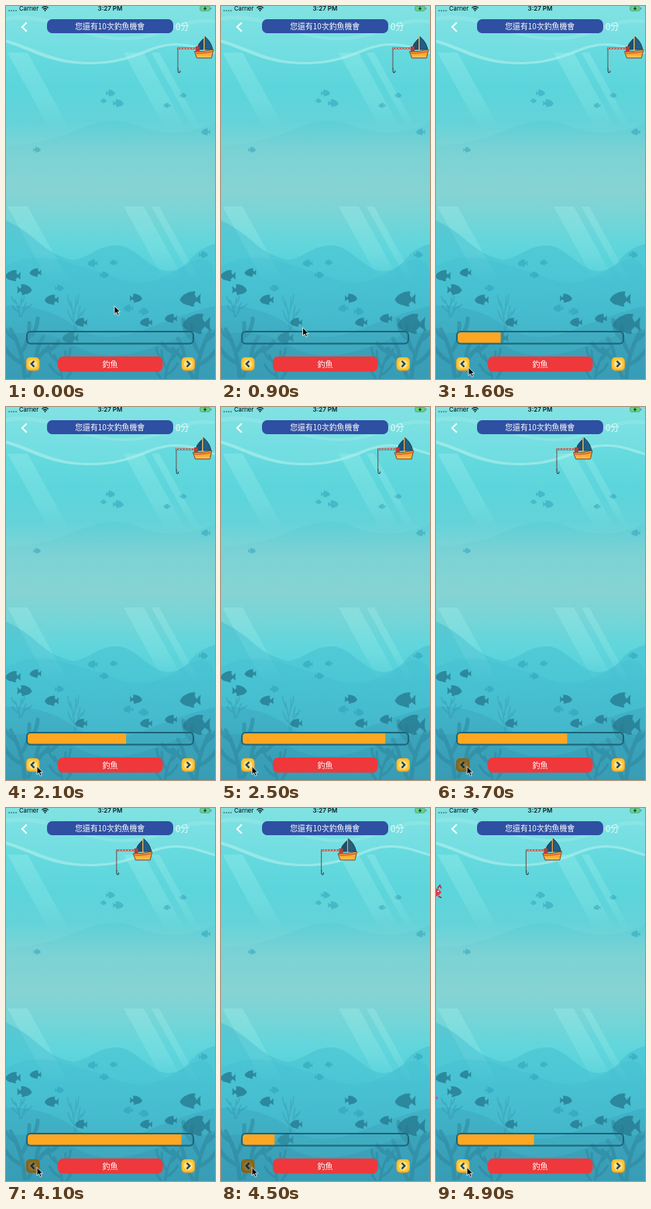
Animation of 270x480 px, one loop 5000 ms. Source, as an HTML page:

```html
<!DOCTYPE html>
<html lang="zh-Hant">
<head>
<meta charset="utf-8">
<title>釣魚</title>
<style>
html, body { margin: 0; width: 100%; height: 100%; overflow: hidden; background: #5cd2da; }
svg { display: block; width: 100vw; height: 100vh; }
text { font-family: "Noto Sans CJK TC", "Noto Sans CJK", "Noto Sans", sans-serif; fill: #fff; }
.status { font-family: Inter, Roboto, sans-serif; fill: #0c1f24; }
</style>
</head>
<body>
<svg viewBox="0 0 270 480" preserveAspectRatio="none">
  <defs>
    <linearGradient id="water" x2="0" y2="1">
      <stop offset="0" stop-color="#78dfdf"/>
      <stop offset=".1" stop-color="#68dbdf"/>
      <stop offset=".22" stop-color="#5bd5db"/>
      <stop offset=".31" stop-color="#64d3d9"/>
      <stop offset=".39" stop-color="#80d4d5"/>
      <stop offset=".5" stop-color="#86d3d3"/>
      <stop offset=".57" stop-color="#75d5d7"/>
      <stop offset=".64" stop-color="#61d6dc"/>
      <stop offset=".72" stop-color="#56d0da"/>
      <stop offset=".84" stop-color="#4fbfd0"/>
      <stop offset="1" stop-color="#46a6bd"/>
    </linearGradient>
    <linearGradient id="ray" x2="0" y2="1">
      <stop offset="0" stop-color="#a8f3ee" stop-opacity=".3"/>
      <stop offset=".6" stop-color="#a8f3ee" stop-opacity=".22"/>
      <stop offset="1" stop-color="#a8f3ee" stop-opacity="0"/>
    </linearGradient>
    <linearGradient id="hill" x2="0" y2="1">
      <stop offset="0" stop-color="#2cacc6" stop-opacity=".34"/>
      <stop offset="1" stop-color="#2cacc6" stop-opacity=".06"/>
    </linearGradient>
    <linearGradient id="rise" x2="0" y2="1">
      <stop offset="0" stop-color="#3cbccb" stop-opacity=".16"/>
      <stop offset="1" stop-color="#3cbccb" stop-opacity="0"/>
    </linearGradient>
    <g id="fish">
      <path d="M10 1C8-4 4-6 0-6Q-4-6-6-1L-10-5Q-9 0-10 5L-6 2Q-3 6 1 6Q7 6 10 1Z"/>
      <path d="M4-5Q0-8-5-7L-4-3ZM3 5Q-1 8-4 7L-3 3Z"/>
    </g>
    <path id="coral" fill="none" stroke-linecap="round" stroke-linejoin="round" d="M22 85Q20 52 4 24M17 54Q29 40 28 16M9 36Q-4 28-8 12M27 34Q38 28 39 10M27 84Q35 62 53 47M37 66Q36 50 46 34M47 52Q58 52 66 40M20 68Q4 62-6 44"/>
    <g id="button">
      <rect x="-8.7" y="-8.5" width="17.4" height="17.4" rx="5" fill="#f0a324"/>
      <rect x="-7.9" y="-8.2" width="15.8" height="15.6" rx="4.5" fill="#ffc534"/>
      <circle r="5.6" fill="#ffe08a"/>
      <path d="M1.8-3.8L-2 0L1.8 3.8" fill="none" stroke="#1d4552" stroke-width="2.2"/>
    </g>
  </defs>

  <rect width="270" height="480" fill="url(#water)"/>
  <path d="M0 0H270V59C250 53 240 48 218 48C185 48 165 71 112 72C65 73 40 55 0 43Z" fill="#a4ebe8" opacity=".2"/>
  <path d="M0 43C40 55 65 73 112 72C165 71 185 48 218 48C240 48 250 53 270 59V62C250 57 240 51 218 51C188 51 168 74 112 75C60 76 40 60 0 47Z" fill="#c8f7f1" opacity=".5"/>
  <path d="M0 14C55 4 95 40 150 40S225 10 270 18V22C220 17 205 45 150 44S55 11 0 19Z" fill="#c2f5ef" opacity=".2"/>
  <path d="M0 180C45 178 70 168 95 158S145 144 168 153S225 171 270 150V230H0Z" fill="url(#rise)"/>
  <g id="rays" fill="url(#ray)"></g>
  <path d="M0 276Q22 286 42 304T87 327C110 323 118 308 143 308S185 341 210 341Q226 341 238 326T270 306V480H0Z" fill="url(#hill)"/>
  <path d="M0 335Q35 316 75 328T150 352T225 337T270 346V480H0Z" fill="#36abc4" opacity=".16"/>
  <path d="M0 386Q50 384 88 411T180 416T270 386V480H0Z" fill="#3192ac" opacity=".24"/>
  <path d="M0 424Q45 412 88 437T190 439T270 422V480H0Z" fill="#2d87a2" opacity=".24"/>
  <g stroke="#2c8299" opacity=".5" stroke-width="5">
    <use href="#coral" transform="translate(2 392)"/>
    <use href="#coral" transform="translate(268 394) scale(-1 1)"/>
    <use href="#coral" transform="translate(60 435) scale(.6)"/>
    <use href="#coral" transform="translate(218 434) scale(-.6 .6)"/>
    <use href="#coral" transform="translate(10 370) scale(.35)" opacity=".6"/>
    <use href="#coral" transform="translate(82 366) scale(.3 .6)" opacity=".5"/>
  </g>
  <g id="shoal"></g>

  <g class="status">
    <g id="dots"></g>
    <text class="status" x="17" y="6.2" font-size="7.6" font-weight="500">Carrier</text>
    <path d="M46.3 2.4Q50.5-1 54.7 2.4M48 4.3Q50.5 2.2 53 4.3" fill="none" stroke="#0c1f24" stroke-width="1.3"/>
    <circle cx="50.5" cy="5.8" r="1"/>
    <text class="status" x="134.5" y="6.2" font-size="8" font-weight="600" text-anchor="middle">3:27 PM</text>
    <rect x="250.8" y=".2" width="12.5" height="6" rx="1.6" fill="#63d87c" stroke="#4b8a8d" stroke-width=".7"/>
    <path d="M258 .2L254.8 3.7H257L256 6.3L259.5 2.7H257.2Z"/>
    <rect x="264.2" y="2" width="1.2" height="2.4" rx=".6" fill="#4b8a8d"/>
  </g>

  <path d="M26.8 21.2L20.8 27L26.8 32.8" fill="none" stroke="#f2ffff" stroke-width="2"/>
  <rect x="53" y="17" width="163" height="18" rx="6.5" fill="#2f4fa2"/>
  <text x="134.2" y="29.8" font-size="9.9" text-anchor="middle">您還有10次釣魚機會</text>
  <text x="219" y="30.5" font-size="11.4" opacity=".85">0分</text>

  <g id="swimmers">
    <g id="red">
      <path d="M0 6Q-4 0-11 1Q-18 2-20 6L-26 1V12L-20 8Q-16 13-9 12Q-3 11 0 6Z" fill="#df3b4c"/>
      <path d="M-5 1L-2-3L0 1M-4 11L0 13" fill="none" stroke="#a92a42" stroke-width="1.5"/>
      <circle cx="-4" cy="4.8" r="1" fill="#fff"/>
    </g>
    <path id="purple" d="M0 0Q-5-5-12-3L-18-5V5L-12 3Q-5 5 0 0Z" fill="#a85bb3"/>
  </g>

  <g id="boat">
    <path d="M222 54V81" stroke="#6d6262" stroke-width="1.2"/>
    <path d="M221.5 54.2H247" stroke="#5d4a4c" stroke-width="2.4"/>
    <path d="M222 54.2H247" stroke="#f0d9c4" stroke-width="1.4"/>
    <path d="M223 54.2H247" stroke="#d5483f" stroke-width="1.6" stroke-dasharray="2.2 1.6"/>
    <path d="M222.2 80V84Q222.3 86 224 85.6Q225.3 85 224.8 83" fill="none" stroke="#37434b" stroke-width="1.1"/>
    <path d="M255 42Q248 48 246.5 56H255Z" fill="#1e4f72" stroke="#183c55" stroke-width=".8"/>
    <path d="M257 39.5Q265 46 267 56H257Z" fill="#235f86" stroke="#183c55" stroke-width="1"/>
    <path d="M256 39V59" stroke="#eda444" stroke-width="1.3"/>
    <path d="M245 52H250V58H245Z" fill="#b63d3c"/>
    <path d="M243.5 58.5Q256 59.5 268 56L265.5 67H246.5Z" fill="#f8ab35" stroke="#745038" stroke-width="1"/>
    <path d="M244.5 60.3Q256 61.5 267 58.6" fill="none" stroke="#d8542f" stroke-width="1.2"/>
    <path d="M247 64.8H265" stroke="#ffc95c" stroke-width="1.2"/>
  </g>

  <rect x="27" y="419" width="215" height="15.5" rx="4.8" fill="#43aabd" fill-opacity=".25"/>
  <clipPath id="inner"><rect x="27.5" y="419.5" width="214" height="14.5" rx="4"/></clipPath>
  <rect id="fill" x="27" y="419" height="15.5" fill="#ffa722" clip-path="url(#inner)"/>
  <rect x="27" y="419" width="215" height="15.5" rx="4.8" fill="none" stroke="#1d657a" stroke-width="2"/>

  <rect x="67" y="451" width="135.5" height="19.5" rx="6.5" fill="#ee383b"/>
  <text x="134.5" y="464.5" font-size="10" text-anchor="middle">釣魚</text>
  <use href="#button" transform="translate(34.7 460.6)"/>
  <rect id="shade" x="26" y="452" width="17.4" height="17.4" rx="5" fill="#1b1608" opacity="0"/>
  <use href="#button" transform="translate(235.3 460.6) scale(-1 1)"/>
  <path id="cursor" d="M0 0V10.5L2.5 8.2L4.3 12.3L6.2 11.5L4.4 7.6H7.6Z" fill="#080808" stroke="#fff" stroke-width=".8"/>
</svg>
<script>
const LOOP = 5000, STEP = 100;
const BAR = { start: 1204, span: 1500, width: 214.5 };
const CLICKS = [2080, 2440, 2780, 3090, 3430, 3760, 4150, 4560];
const HOLD = 130, GLIDE = 130, STRIDE = 13.2;
const $ = id => document.getElementById(id);
const clamp = v => Math.max(0, Math.min(1, v));
const ease = v => v * v * (3 - 2 * v);
const place = (el, x, y) => el.setAttribute("transform", `translate(${x} ${y})`);

// x, y, length, direction
const near = [[9,347,20,-1],[38,343,15,-1],[24,365,19,1],[59,378,18,-1],[97,407,16,-1],
  [83,427,21,-1],[168,376,16,1],[181,407,16,-1],[213,402,16,-1],[238,377,27,-1],[246,409,36,-1]];
const far = [[145,125,14,1],[135,112,12,1],[126,122,8,1],[40,185,10,1],[208,128,9,-1],
  [229,115,9,1],[258,162,12,-1],[112,331,13,-1],[127,346,12,1],[139,330,10,-1],
  [255,320,12,1],[69,363,12,1],[158,389,13,-1],[178,393,13,1]];
const school = (list, color, alpha) => `<g fill="${color}" opacity="${alpha}">` + list.map(
  ([x, y, size, dir]) => `<use href="#fish" transform="translate(${x} ${y}) scale(${dir * size / 20} ${size / 20})"/>`
).join("") + "</g>";
$("shoal").innerHTML = school(far, "#2c9cb5", .48) + school(near, "#26798f", .78);

// left edge and width of each beam, repeated in both halves of the water
const beams = [[2, 26], [152, 26], [188, 10]];
$("rays").innerHTML = [60, 258].map(y => beams.map(([x, w]) =>
  `<path d="M${x} ${y}h${w}l54 98h${-w}Z"/>`).join("")).join("");
$("dots").innerHTML = [4, 7, 10, 13].map(x => `<circle cx="${x}" cy="6" r=".7"/>`).join("");

function draw(t) {
  const moved = CLICKS.reduce((sum, c) => sum + STRIDE * clamp((t - c) / GLIDE), 0);
  place($("boat"), -moved, 0);

  const age = t - BAR.start;
  const part = age < 0 ? 0 : age % BAR.span / BAR.span;
  $("fill").setAttribute("width", part * BAR.width);

  const down = CLICKS.some(c => t >= c - HOLD && t < c);
  $("shade").setAttribute("opacity", down ? .52 : 0);

  const go = ease(clamp((t - 500) / 1000));
  const settle = ease(clamp((t - 1600) / 300));
  place($("cursor"), 140 - 98 * go - 2 * settle, 386 + 79 * go - 2.5 * settle);

  const swim = (t - 4900) * .05;
  place($("red"), 7 + swim, 102.5);
  place($("purple"), 3 + swim, 373);
  $("swimmers").setAttribute("visibility", t >= 4700 ? "visible" : "hidden");
}

const begin = performance.now();
function tick() {
  const t = (performance.now() - begin) % LOOP;
  draw(Math.floor(t / STEP) * STEP);
  requestAnimationFrame(tick);
}
draw(0);
requestAnimationFrame(tick);
</script>
</body>
</html>
```
